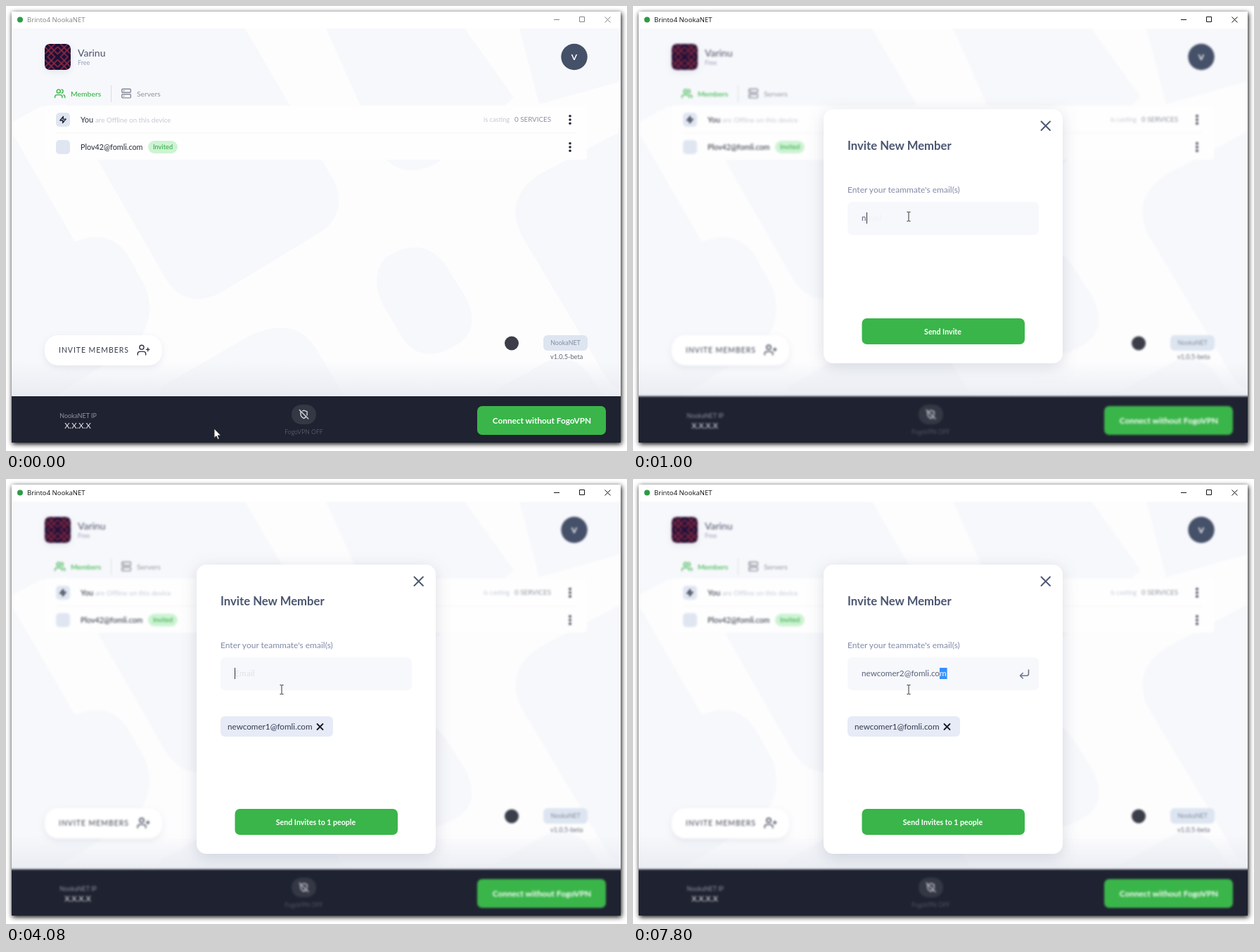
An HTML page that plays this animation: 883x634 px, repeating every 8000 ms.

```html
<!DOCTYPE html>
<html lang="en">
<head>
<meta charset="utf-8">
<title>Invite members</title>
<style>
  html, body { margin: 0; width: 100%; height: 100%; overflow: hidden; background: #fff; }
  svg { display: block; }
  text { font-family: Lato, sans-serif; white-space: pre; }
  .mid { text-anchor: middle; }
  .medium { font-weight: 500; }
  .bold { font-weight: 700; }
  .icon { fill: none; stroke: currentColor; stroke-width: 1.4; stroke-linecap: round; stroke-linejoin: round; }
  .icon path { vector-effect: non-scaling-stroke; }
  .frame { fill: #fff; filter: drop-shadow(1px 2px 3.5px #000); }
  .soft { filter: drop-shadow(0 3px 5px rgba(60, 75, 120, .1)); }

  #titlebar { animation: activate 8s step-end infinite; }
  #page { animation: defocus 8s linear infinite; }
  #modal { animation: drop 8s infinite; }
  #pointer { animation: travel 8s ease-in-out infinite; }
  #arrow { animation: leave 8s step-end infinite; }
  #beam { animation: enter 8s step-end infinite; }

  @keyframes activate { 0% { color: #858585; } 3%, 100% { color: #111; } }
  @keyframes defocus { 0%, 3% { filter: blur(0); } 4%, 100% { filter: blur(1.8px); } }
  @keyframes drop {
    0%, 3% { opacity: 0; transform: translateY(-50px); animation-timing-function: cubic-bezier(.333, .667, .667, 1); }
    6%, 100% { opacity: 1; transform: none; }
  }
  @keyframes travel {
    0%, .5% { transform: translate(296px, 602px); }
    2.5%, 4.5% { transform: translate(184px, 481px); }
    7.3%, 100% { transform: translate(392px, 300px); }
  }
  @keyframes leave { 0% { opacity: 1; } 7%, 100% { opacity: 0; } }
  @keyframes enter { 0% { opacity: 0; } 7%, 100% { opacity: 1; } }

  #card { y: 147px; height: 362px; filter: drop-shadow(0 5px 11px rgba(50, 60, 95, .17)); }
  #chip { visibility: hidden; }
  .expanded #card { y: 122px; height: 412px; }
  .expanded #chip { visibility: visible; }
  .expanded #form { transform: translateY(-25px); }
  .expanded #send { transform: translateY(25px); }
</style>
</head>
<body>
<svg width="883" height="634" viewBox="0 0 883 634">
  <defs>
    <clipPath id="client"><rect x="8" y="32" width="866" height="590"/></clipPath>
    <pattern id="lattice" x="55" y="54" width="18.5" height="18.5" patternUnits="userSpaceOnUse">
      <rect width="18.5" height="18.5" fill="#1c1038"/>
      <path d="M0 4 9.25 13.25 18.5 4M0 14.5 9.25 5.25 18.5 14.5M0-4 9.25 5.25 18.5-4M0 22.5 9.25 13.25 18.5 22.5" fill="none" stroke="#93293f" stroke-width="1.5"/>
    </pattern>
    <linearGradient id="haze" x2="0" y2="1">
      <stop stop-color="#e6e9f0" stop-opacity="0"/>
      <stop offset="1" stop-color="#e6e9f0" stop-opacity=".8"/>
    </linearGradient>
    <g id="more" fill="#23273a"><circle cy="-5.3" r="1.8"/><circle r="1.8"/><circle cy="5.3" r="1.8"/></g>
  </defs>

  <rect class="frame" x="8" y="8" width="866" height="614"/>
  <g id="titlebar">
    <circle cx="20" cy="19.5" r="4" fill="#2d9b45"/>
    <text x="30" y="23.3" fill="currentColor" style="font: 9.6px 'Open Sans', sans-serif">Brinto4 NookaNET</text>
    <path d="M779 19.5h8M815.5 15.5h7v7h-7zM851.5 15.5l8 8m0-8-8 8" fill="none" stroke="currentColor"/>
  </g>

  <g clip-path="url(#client)">
    <g id="page">
      <rect x="-20" y="32" width="930" height="560" fill="#fdfdfe"/>
      <g fill="#f7f8fb">
        <path d="M-20 32H340L466 248Q486 290 452 319L308 407Q254 436 225 385L85 140 50 143 8 166-20 180Z"/>
        <path d="M-20 140 14 190 98 336Q150 314 176 360L197 398Q216 442 184 482L70 556H-20Z"/>
        <path d="M455 32H652L722 130 640 205Q572 260 535 212Z"/>
        <path d="M730 32H900V165L758 240Q708 274 732 325L860 540 900 556V100L758 140Z"/>
        <path d="M540 358Q592 325 624 368L652 412Q677 459 642 482 590 515 562 470L535 424Q517 384 540 358Z"/>
        <path d="M215 556 222 542 346 470Q410 440 440 487L481 556Z"/>
        <path d="M680 556 770 506Q800 494 826 520L850 556Z"/>
      </g>
      <rect x="-20" y="505" width="930" height="51" fill="url(#haze)"/>

      <rect class="soft" x="55" y="54" width="37" height="37" rx="7" fill="url(#lattice)"/>
      <text x="102" y="72" font-size="14" fill="#4a5169">Varinu</text>
      <text class="medium" x="102" y="84" font-size="9" fill="#9fa7c0">Free</text>
      <circle cx="808" cy="72.5" r="18.7" fill="#455069"/>
      <text class="mid bold" x="808" y="77" font-size="12" fill="#fff">V</text>

      <g class="icon" transform="translate(69 117) scale(.64)" color="#35b249">
        <path d="M17 21v-2a4 4 0 0 0-4-4H5a4 4 0 0 0-4 4v2M5 7a4 4 0 1 0 8 0 4 4 0 1 0-8 0M23 21v-2a4 4 0 0 0-3-3.9M16 3.1a4 4 0 0 1 0 7.8"/>
      </g>
      <text class="medium" x="92" y="128.7" font-size="10.4" fill="#35b249">Members</text>
      <path d="M149.500 113v24" stroke="#d9dce3"/>
      <g class="icon" transform="translate(163.500 117) scale(.63)" color="#858a97">
        <path d="M4 2h16q2 0 2 2v4q0 2-2 2H4q-2 0-2-2V4q0-2 2-2M4 14h16q2 0 2 2v4q0 2-2 2H4q-2 0-2-2v-4q0-2 2-2M6 6h1M6 18h1"/>
      </g>
      <text x="186" y="128.700" font-size="10.4" fill="#8e939f">Servers</text>

      <rect x="55" y="142" width="771" height="77" rx="5" fill="#fefefe"/>
      <path d="M71 181h739" stroke="#f4f5f8"/>
      <g fill="#dfe6f2"><rect x="71" y="152" width="20" height="20" rx="5"/><rect x="71" y="191" width="20" height="20" rx="5"/></g>
      <g class="icon" transform="translate(75.500 156.500) scale(.46)" color="#1d2130"><path d="M13 2 3 14h9l-1 8 10-12h-9Z"/></g>
      <text x="106" y="165.600" font-size="11" fill="#252a3b">You</text>
      <text x="127" y="165.600" font-size="9.8" fill="#c3c8d6">are Offline on this device</text>
      <text x="679" y="165" font-size="9.2" fill="#c3c8d6">is casting</text>
      <text x="723" y="165" font-size="9.8" fill="#8b909e">0 SERVICES</text>
      <use href="#more" x="802" y="162"/>
      <text x="106" y="204.600" font-size="10.8" fill="#252a3b">Plov42@fomli.com</text>
      <rect x="202" y="192" width="42" height="18" rx="9" fill="#cdf3d3"/>
      <text class="mid medium" x="223" y="204.300" font-size="9.300" fill="#39ab4b">Invited</text>
      <use href="#more" x="802" y="201"/>

      <rect class="soft" x="55" y="469" width="167" height="43" rx="19" fill="#fff"/>
      <text x="75" y="494" font-size="10.500" letter-spacing=".95" fill="#373c4c">INVITE MEMBERS</text>
      <g class="icon" transform="translate(186.500 481) scale(.76)" color="#303547">
        <path d="M16 21v-2a4 4 0 0 0-4-4H5a4 4 0 0 0-4 4v2M4.500 7a4 4 0 1 0 8 0 4 4 0 1 0-8 0M20 8v6M23 11h-6"/>
      </g>

      <circle cx="719" cy="480.500" r="10" fill="#3b3d48"/>
      <rect x="764" y="469" width="63" height="22" rx="6" fill="#dde5f1"/>
      <text class="mid" x="795.500" y="483.200" font-size="8.900" fill="#858da0">NookaNET</text>
      <text x="774" y="502.800" font-size="9.200" fill="#606573">v1.0.5-beta</text>

      <rect x="-20" y="556" width="930" height="100" fill="#1f2230"/>
      <text class="mid" x="102.500" y="587" font-size="8.900" fill="#9094a1">NookaNET IP</text>
      <text class="mid medium" x="102" y="602" font-size="11.300" fill="#dcdee5">X.X.X.X</text>
      <rect x="406" y="568" width="35" height="28" rx="14" fill="#343744"/>
      <g class="icon" transform="translate(416.700 575) scale(.57)" color="#d6d8df">
        <path d="M19.700 14a7 7 0 0 0 .3-2V5l-8-3-3.200 1.200M4.700 4.700 4 5v7c0 6 8 10 8 10a20 20 0 0 0 5.600-4.400M1 1l22 22"/>
      </g>
      <text class="mid" x="423.500" y="610" font-size="8.600" fill="#505463">FogoVPN OFF</text>
      <rect x="670" y="570" width="183" height="41" rx="7" fill="#3ab54a"/>
      <text class="mid bold" x="762" y="595" font-size="11.800" fill="#fff">Connect without FogoVPN</text>
    </g>
  </g>

  <g id="modal">
    <rect id="card" x="271" width="340" rx="14" fill="#fff"/>
    <g id="form">
      <path d="M580.500 164.500l12.500 12.500m0-12.500-12.500 12.500" stroke="#4b5671" stroke-width="1.9" stroke-linecap="round"/>
      <text class="bold" x="305" y="205" font-size="16.700" fill="#4b5671">Invite New Member</text>
      <text x="305" y="265.500" font-size="12" fill="#818aa8">Enter your teammate's email(s)</text>
      <rect x="305" y="279" width="272" height="47" rx="7" fill="#f7f8fb"/>
      <text id="placeholder" x="325" y="306" font-size="12.100" fill="#dfe2e9">Email</text>
      <text id="typed" x="325" y="306" font-size="11.700" fill="#566079"></text>
      <g id="selection">
        <rect id="mark" y="294" height="16" fill="#3390ff"/>
        <text id="marked" y="306" font-size="11.700" fill="#fff"></text>
      </g>
      <rect id="caret" y="294" width="1" height="16" fill="#30374a"/>
      <g id="submit" class="icon" transform="translate(547.500 294) scale(.75)" color="#6a748f" style="stroke-width: 1.6">
        <path d="M9 10 4 15l5 5M20 4v7a4 4 0 0 1-4 4H4"/>
      </g>
    </g>
    <g id="chip">
      <rect x="305" y="338" width="160" height="29" rx="6" fill="#e6ebf7"/>
      <text x="315" y="356.500" font-size="11.700" fill="#343b50">newcomer1@fomli.com</text>
      <path d="M442.500 349l8 8m0-8-8 8" stroke="#161925" stroke-width="1.800" stroke-linecap="round"/>
    </g>
    <g id="send">
      <rect x="325.500" y="445" width="231.500" height="37" rx="7" fill="#3ab54a"/>
      <text id="sendLabel" class="mid bold" x="440.500" y="467.700" font-size="10.600" fill="#fff"></text>
    </g>
  </g>

  <g id="pointer">
    <path id="arrow" d="M0 0V13.500L3 10.700 5.200 15.500 7.300 14.600 5.200 9.900H9.500Z" fill="#fff" stroke="#222" stroke-width=".9"/>
    <path id="beam" d="M-2.500-6.500H-.8L0-5.800.8-6.500H2.500M0-5.800V5.800M-2.500 6.500H-.8L0 5.800.8 6.500H2.500" fill="none" stroke="#333"/>
  </g>
</svg>
<script>
  const LOOP = 8000, FOCUS = 560, SUBMIT = 3840, SELECT = 7800, BLINK = 280;
  const entries = [
    { text: 'newcomer1@fomli.com',
      keys: [1000, 1080, 1200, 1320, 1400, 1520, 1680, 1760, 2160, 2440,
             2680, 2760, 2840, 2920, 3040, 3120, 3320, 3400, 3480] },
    { text: 'newcomer2@fomli.com',
      keys: [4240, 4320, 4440, 4520, 4680, 4800, 5280, 5400, 5800, 6240,
             6480, 6560, 6680, 6760, 6880, 7040, 7200, 7280, 7440] }
  ];
  const inputTimes = [FOCUS, ...entries.flatMap(entry => entry.keys)];

  const el = id => document.getElementById(id);
  const show = (id, on) => el(id).setAttribute('visibility', on ? 'visible' : 'hidden');

  function render(t) {
    const expanded = t >= SUBMIT, selecting = t >= SELECT;
    const { text, keys } = entries[expanded ? 1 : 0];
    const value = text.slice(0, keys.filter(k => k <= t).length);
    const typed = el('typed');

    typed.textContent = value;
    const end = 325 + typed.getComputedTextLength();
    el('modal').classList.toggle('expanded', expanded);
    el('sendLabel').textContent = expanded ? 'Send Invites to 1 people' : 'Send Invite';
    el('placeholder').setAttribute('opacity', [1, .3][value.length] ?? 0);
    show('submit', /\.\w\w/.test(value));

    // The caret restarts its blink on every key press.
    const idle = t - Math.max(...inputTimes.filter(k => k <= t));
    el('caret').setAttribute('x', Math.round(end));
    show('caret', t >= FOCUS && !selecting && idle % (2 * BLINK) < BLINK);

    show('selection', selecting);
    if (selecting) {
      const start = 325 + typed.getSubStringLength(0, value.length - 1);
      el('mark').setAttribute('x', start);
      el('mark').setAttribute('width', end - start + 1);
      el('marked').setAttribute('x', start);
      el('marked').textContent = value.slice(-1);
    }
  }

  let origin;
  function tick(now) {
    origin ??= now;
    render((now - origin) % LOOP);
    requestAnimationFrame(tick);
  }
  render(0);
  requestAnimationFrame(tick);
</script>
</body>
</html>
```
